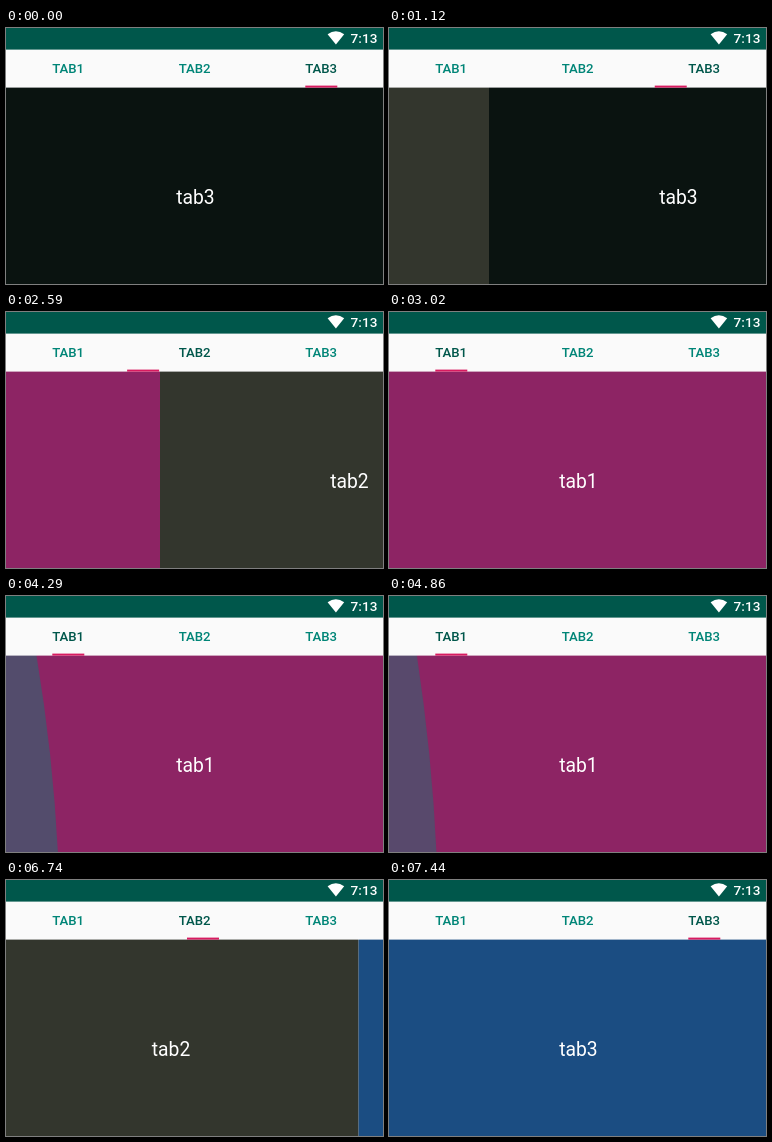
Recreate the animation shown at these times as an HTML page. Size 377x256 px, loop 8280 ms.

```html
<!DOCTYPE html>
<html lang="en">
<head>
<meta charset="utf-8">
<title>Swipe tabs</title>
<style>
  html, body { margin: 0; width: 100%; height: 100%; overflow: hidden; background: #fafafa; }
  svg { display: block; width: 377px; height: 256px; font-family: Roboto, sans-serif; }
  .tab { font-size: 13.2px; font-weight: 500; text-anchor: middle; }
  .word { font-size: 19.3px; fill: #fff; }
  .clock { font-size: 13.6px; font-weight: 500; fill: #fff; text-anchor: end; }
</style>
</head>
<body>
<svg id="stage" viewBox="0 0 377 256">
  <g id="pages"></g>
  <path id="glow" fill="#008577"/>
  <rect y="21.6" width="377" height="38" fill="#fafafa"/>
  <rect width="377" height="21.6" fill="#00574b"/>
  <path d="M321.6 6.2Q329.9 .4 338.2 6.2L329.9 16.5Z" fill="#fff"/>
  <text class="clock" x="371.4" y="15.3">7:13</text>
  <g id="tabs"></g>
  <rect id="bar" y="57.6" width="32" height="2" fill="#d81b60"/>
</svg>
<script>
const LOOP = 8280, STEP = 138, W = 377, TOP = 59, BOTTOM = 256, TAB_GAP = 126.5;
const COLORS = ['#8d2464', '#33362d', '#0a1310'], NEW_COLOR = '#1b4d82';
const GLOW_START = 4285, GLOW_MAX = 66, DRAG_SPEED = 91;

// A finger drags the page, lets go after `release` steps, then the rest eases out over `span` steps
const SWIPES = [
  { start: 1095, from: 2, to: 1, drag: 100, release: 1, rest: 158, span: 4 },
  { start: 2570, from: 1, to: 0, drag: 154, release: 1, rest: 135, span: 2 },
  { start: 5500, from: 0, to: 1, drag: 60, release: 1, rest: 206, span: 4.3 },
  { start: 6720, from: 1, to: 2, drag: 24.4, release: 2, rest: 121, span: 3.4 }
];

const $ = id => document.getElementById(id);

function add(parent, name, attrs, text) {
  const el = document.createElementNS('http://www.w3.org/2000/svg', name);
  for (const key in attrs) el.setAttribute(key, attrs[key]);
  if (text) el.textContent = text;
  parent.appendChild(el);
  return el;
}

const pages = COLORS.map((fill, i) => {
  const group = add($('pages'), 'g', {});
  const back = add(group, 'rect', { y: TOP, width: W, height: BOTTOM - TOP, fill });
  add(group, 'text', { class: 'word', x: 170.2, y: 176.1 }, 'tab' + (i + 1));
  return { group, back };
});

const tabs = COLORS.map((_, i) =>
  add($('tabs'), 'text', { class: 'tab', x: 62.2 + TAB_GAP * i, y: 45.3 }, 'TAB' + (i + 1)));

// The screen refreshes in even steps
const stepsSince = (start, t) => Math.floor((t - start) / STEP);

function pagerState(t) {
  const swipe = SWIPES.findLast(s => t >= s.start);
  if (!swipe) return { scroll: 2 * W, selected: 2 };
  const { start, from, to, drag, release, rest, span } = swipe;
  const k = stepsSince(start, t);
  const moved = k < release
    ? drag + DRAG_SPEED * k
    : W - rest * Math.max(0, 1 - (k - release) / span) ** 5;
  return { scroll: from * W + (to - from) * moved, selected: k < release ? from : to };
}

// Overscroll glow: swells while pulled, then shrinks evenly
function glowSize(t) {
  const k = stepsSince(GLOW_START, t);
  if (k < 0) return 0;
  const pull = GLOW_MAX * (1 - 0.18 * 0.33 ** k);
  const shrink = GLOW_MAX * 0.375 * (6 - k);
  return Math.max(0, Math.min(pull, shrink));
}

// A shallow arc centred below the visible area
function glowPath(size) {
  const edge = y => size * (1 - 5.43e-6 * (y - 343) ** 2);
  const mid = (TOP + BOTTOM) / 2;
  const ctrl = 2 * edge(mid) - (edge(TOP) + edge(BOTTOM)) / 2;
  return `M0 ${TOP}H${edge(TOP)}Q${ctrl} ${mid} ${edge(BOTTOM)} ${BOTTOM}H0Z`;
}

function draw(t) {
  const { scroll, selected } = pagerState(t), size = glowSize(t);
  pages.forEach(({ group }, i) => group.setAttribute('transform', `translate(${W * i - scroll} 0)`));
  // The last page is rebuilt in a new colour once it has been left behind
  pages[2].back.setAttribute('fill', t < GLOW_START ? COLORS[2] : NEW_COLOR);
  tabs.forEach((tab, i) => tab.setAttribute('fill', i === selected ? '#00574b' : '#008577'));
  $('bar').setAttribute('x', 46.3 + TAB_GAP * scroll / W);
  $('glow').setAttribute('d', glowPath(size));
  $('glow').setAttribute('fill-opacity', 0.5 * size / GLOW_MAX);
}

const start = performance.now();
function tick() {
  draw((performance.now() - start) % LOOP);
  requestAnimationFrame(tick);
}
draw(0);
requestAnimationFrame(tick);
</script>
</body>
</html>
```
